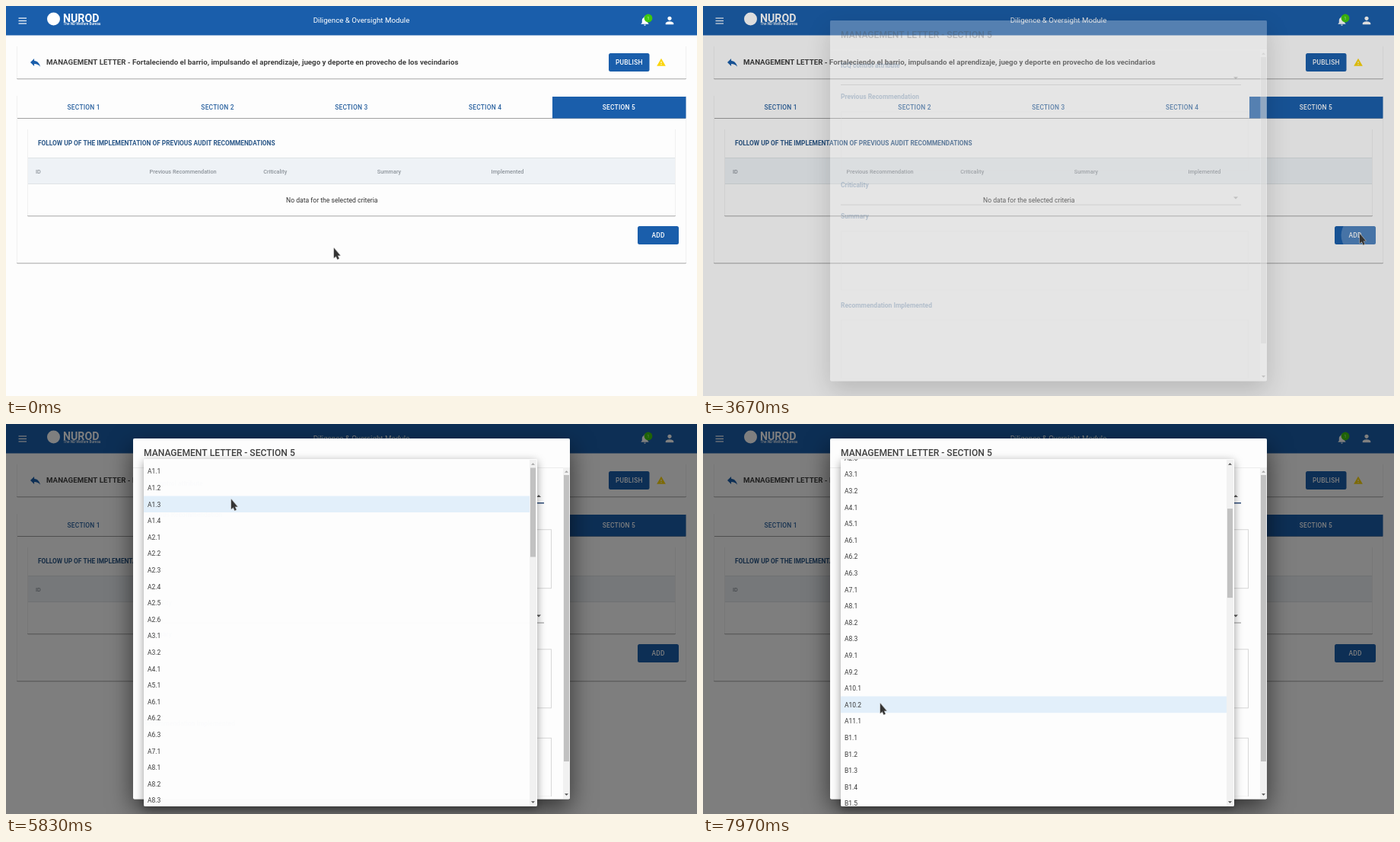
An HTML page with a canvas that plays this animation: 908x512 px, repeating every 8000 ms.

```html
<!DOCTYPE html>
<html lang="en">
<head>
<meta charset="utf-8">
<title>Management letter</title>
<style>
html, body { margin: 0; width: 100%; height: 100%; overflow: hidden; background: #fdfdfd; }
canvas { display: block; }
</style>
</head>
<body>
<canvas id="stage" width="908" height="512"></canvas>
<script>
const ctx = document.getElementById('stage').getContext('2d');
const LOOP = 8000;
const PAPER = '#fdfdfd', BLUE = '#1a5eab', WHITE = '#ffffff', INK = '#404040';
const SLATE = '#2a62a0', LABEL = '#2a5788';
const FADE_AT = 3612, MENU_AT = 5530;
const ICONS = {
  bell: new Path2D('M12 22c1.1 0 2-.9 2-2h-4c0 1.1.89 2 2 2zm6-6v-5c0-3.07-1.64-5.64-4.5-6.32V4c0-.83-.67-1.5-1.5-1.5s-1.5.67-1.5 1.5v.68C7.63 5.36 6 7.92 6 11v5l-2 2v1h16v-1l-2-2z'),
  person: new Path2D('M12 12c2.21 0 4-1.79 4-4s-1.79-4-4-4-4 1.79-4 4 1.79 4 4 4zm0 2c-2.67 0-8 1.34-8 4v2h16v-2c0-2.66-5.33-4-8-4z'),
  reply: new Path2D('M10 9V5l-7 7 7 7v-4.1c5 0 8.5 1.6 11 5.1-1-5-4-10-11-11z'),
  warning: new Path2D('M1 21h22L12 2 1 21zm12-3h-2v-2h2v2zm0-4h-2v-4h2v4z')
};
const ARROW = new Path2D('M0 0V12.6L2.7 10.2L4.6 14.4L6.5 13.5L4.6 9.4H8Z');
const HAND = new Path2D('M-1 1Q0-.6 1.2 1V5L6.5 6Q8 6.4 7.8 8.5L6.8 14.5H.6L-3.6 9.6Q-4 8 -3.4 7.6Q-2.4 7.2-1 8.8Z');

// Code groups of the list: letter and the size of each group
const CODES = [['A', [4, 6, 2, 1, 1, 3, 1, 3, 2, 2, 1]], ['B', [6, 4, 5, 3, 4]]]
  .flatMap(([letter, counts]) => counts.flatMap((n, s) =>
    Array.from({ length: n }, (_, i) => `${letter}${s + 1}.${i + 1}`)));
const ROW = 21.6, LIST_TOP = 51.2;

// Pointer path: time, x, y
const PATH = [
  [770, 431, 318], [1100, 882, 303], [1400, 882, 303], [1750, 869, 302],
  [2100, 866, 300], [2500, 866, 300], [2700, 865, 300], [3070, 863, 299],
  [4220, 863, 299], [4830, 304, 113], [5180, 296, 99], [5900, 296, 99],
  [6500, 286, 316], [7530, 286, 316], [7950, 233, 367]
];

const clamp = x => Math.max(0, Math.min(1, x));
const span = (t, from, length) => clamp((t - from) / length);
const smooth = x => x * x * (3 - 2 * x);

// Standard curve cubic-bezier(.4, 0, .2, 1)
function ease(x) {
  if (x <= 0 || x >= 1) return clamp(x);
  let lo = 0, hi = 1, u = x;
  for (let i = 0; i < 14; i++) {
    u = (lo + hi) / 2;
    const bx = 1.2 * u * (1 - u) ** 2 + 0.6 * u * u * (1 - u) + u ** 3;
    if (bx < x) lo = u; else hi = u;
  }
  return smooth(u);
}

function box(x, y, w, h, fill, radius = 0) {
  ctx.fillStyle = fill;
  ctx.beginPath();
  ctx.roundRect(x, y, w, h, radius);
  ctx.fill();
}

function circle(x, y, r, fill) {
  ctx.fillStyle = fill;
  ctx.beginPath();
  ctx.arc(x, y, r, 0, 7);
  ctx.fill();
}

// y is the middle of the capitals
function text(str, x, y, size, fill, { weight = 400, align = 'left', spacing = 0 } = {}) {
  ctx.font = `${weight} ${size}px Roboto, Arial, sans-serif`;
  ctx.letterSpacing = spacing + 'px';
  ctx.textAlign = align;
  ctx.fillStyle = fill;
  ctx.fillText(str, x, y + size * 0.355);
  ctx.letterSpacing = '0px';
}

function icon(name, x, y, scale, fill) {
  ctx.save();
  ctx.translate(x - 12 * scale, y - 12 * scale);
  ctx.scale(scale, scale);
  ctx.fillStyle = fill;
  ctx.fill(ICONS[name]);
  ctx.restore();
}

function caret(x, y, dir, fill, half = 3) {
  ctx.fillStyle = fill;
  ctx.beginPath();
  ctx.moveTo(x - half, y - dir * half / 2);
  ctx.lineTo(x + half, y - dir * half / 2);
  ctx.lineTo(x, y + dir * half / 2);
  ctx.fill();
}

function frame(x, y, w, h, edge) {
  ctx.strokeStyle = edge;
  ctx.lineWidth = 1;
  ctx.strokeRect(x + 0.5, y + 0.5, w, h);
}

const caps = { weight: 500, align: 'center', spacing: 0.24 };

function header() {
  box(0, 0, 908, 38.5, BLUE);
  for (let i = 0; i < 3; i++) box(16.5, 15.4 + i * 3.5, 10.5, 1.2, WHITE);
  circle(62.5, 17, 8.5, WHITE);
  text('NUROD', 75, 15.5, 14.2, WHITE, { weight: 700 });
  text('The ND Welfare Bureau', 75.5, 23, 4.7, WHITE, { weight: 500 });
  text('Diligence & Oversight Module', 467, 19, 9.74, WHITE, { align: 'center' });
  icon('bell', 839.5, 19.5, 0.62, WHITE);
  circle(844, 16, 5.4, '#3fc80f');
  text('1', 844, 16, 5, '#e4ffd0', { align: 'center' });
  icon('person', 872, 19, 0.66, WHITE);
}

function card(x, y, w, h) {
  box(x, y, 1, h, '#f0f0f0');
  box(x + w - 1, y, 1, h, '#f0f0f0');
  box(x, y + h - 1, w, 1, '#bdbdbd');
  box(x + 1, y + h, w - 2, 1, '#e6e6e6');
}

function button(label, x, y, w, h) {
  box(x, y, w, h, BLUE, 2.5);
  text(label, x + w / 2 + 0.1, y + h / 2, 8.4, WHITE, caps);
}

function ripple(t) {
  if (t < 3440 || t > 4100) return;
  ctx.save();
  ctx.beginPath();
  ctx.roundRect(830, 289, 54, 24, 2.5);
  ctx.clip();
  ctx.globalAlpha = 0.24 * (1 - span(t, 3740, 360));
  circle(864, 301, 39 * ease(span(t, 3440, 550)), WHITE);
  ctx.restore();
}

function page(t) {
  box(0, 0, 908, 512, PAPER);
  header();

  card(14, 53, 880, 43);
  icon('reply', 38.5, 74, 0.72, BLUE);
  text('MANAGEMENT LETTER - Fortaleciendo el barrio, impulsando el aprendizaje, juego y deporte en provecho de los vecindarios',
    53, 73.5, 9.73, INK, { weight: 700 });
  button('PUBLISH', 792, 62, 53.5, 24);
  icon('warning', 861, 74, 0.53, '#fbd50c');

  card(14, 118, 880, 220);
  box(15, 147, 878, 1, '#a0a0a0');
  box(718, 119, 175.5, 28.5, BLUE);
  for (let i = 0; i < 5; i++) {
    text('SECTION ' + (i + 1), 102.2 + i * 175.8, 133.3, 8.4, i === 4 ? WHITE : SLATE, caps);
  }

  card(28, 162, 852, 114);
  text('FOLLOW UP OF THE IMPLEMENTATION OF PREVIOUS AUDIT RECOMMENDATIONS',
    42, 180.5, 8.33, LABEL, { weight: 700 });
  box(29, 199, 850, 35, '#eef2f6');
  box(29, 199, 850, 1, '#dfe3e6');
  box(29, 233, 850, 1, '#dfe3e6');
  ['ID', 'Previous Recommendation', 'Criticality', 'Summary', 'Implemented'].forEach((name, i) =>
    text(name, 39 + i * 149.6, 217, 7.3, '#8d949b', { weight: 500 }));
  text('No data for the selected criteria', 428.3, 254.5, 8.6, '#333333', { align: 'center' });
  button('ADD', 830, 289, 54, 24);
  ripple(t);
}

function scrollbar(x, top, bottom, thumbY, thumbH, upInk) {
  box(x, top, 9, bottom - top, '#f1f1f1');
  box(x + 1, thumbY, 7, thumbH, '#c1c1c1');
  caret(x + 4.5, top + 5.5, -1, upInk, 2.5);
  caret(x + 4.5, bottom - 5.5, 1, '#505050', 2.5);
}

// Panel whose shadow falls outside only, so it stays clean while translucent
function panel(x, y, w, h, blur, dy, color) {
  ctx.save();
  ctx.beginPath();
  ctx.rect(0, 0, 908, 512);
  ctx.roundRect(x, y, w, h, 2);
  ctx.clip('evenodd');
  ctx.shadowBlur = blur;
  ctx.shadowOffsetY = dy;
  ctx.shadowColor = color;
  box(x, y, w, h, PAPER, 2);
  ctx.restore();
  box(x, y, w, h, PAPER, 2);
}

function select(label, y, open) {
  text(label, 181, y, 8.5, LABEL, { weight: 700 });
  box(181, y + 25.3, 526, open ? 1.4 : 1, open ? '#2c4a78' : '#949494');
  caret(700, y + 16.8, open ? -1 : 1, '#555555');
}

function area(label, y) {
  text(label, 181, y, 8.5, LABEL, { weight: 700 });
  frame(181, y + 19, 535, 77, '#d8d8d8');
}

function dialog(alpha, open) {
  if (!alpha) return;
  ctx.save();
  ctx.globalAlpha = alpha;
  panel(167, 19, 574, 473.5, 32, 12, 'rgba(0,0,0,.6)');
  text('MANAGEMENT LETTER - SECTION 5', 181, 38, 12.1, INK, { weight: 500 });
  box(167, 57, 574, 1, '#ececec');
  scrollbar(732, 57, 492, 67, 376, '#a3a3a3');
  ctx.beginPath();
  ctx.rect(167, 57, 565, 432);
  ctx.clip();
  select('ICQ control attribute', 77.7, open);
  area('Previous Recommendation', 119.2);
  select('Criticality', 235.2, false);
  area('Summary', 276.3);
  area('Recommendation Implemented', 392.8);
  ctx.restore();
}

function menu(t, pointer) {
  if (t < MENU_AT) return;
  const grow = ease(span(t, MENU_AT, 232));
  const scroll = 106 * (ease(span(t, 6560, 220)) + ease(span(t, 6950, 220)));
  // The hovered row is only looked up again once scrolling rests
  const settled = t < 6840 ? 0 : t < 7250 ? 106 : 212;
  const hover = Math.floor((pointer.y - LIST_TOP + settled) / ROW);

  ctx.save();
  ctx.globalAlpha = ease(span(t, MENU_AT, 348));
  ctx.translate(439, 94);
  ctx.scale(0.75 + 0.25 * grow, 0.5625 + 0.4375 * grow);
  ctx.translate(-439, -94);
  panel(181, 46, 517, 456, 12, 3, 'rgba(0,0,0,.4)');
  ctx.beginPath();
  ctx.rect(181, 46, 517, 456);
  ctx.clip();
  CODES.forEach((code, i) => {
    const y = LIST_TOP + i * ROW - scroll;
    if (y < 20 || y > 510) return;
    if (i === hover) box(181, y, 507, ROW, '#e2effa');
    text(code, 186, y + 11.2, 8.5, '#383838');
  });
  scrollbar(688, 47, 502, 57.5 + scroll * 0.253, 117, scroll > 0 ? '#505050' : '#a3a3a3');
  ctx.restore();
}

function pointerAt(t) {
  let [t0, x0, y0] = PATH[0];
  for (const [t1, x1, y1] of PATH) {
    if (t < t1) {
      const k = smooth(span(t, t0, t1 - t0 || 1));
      return { x: x0 + (x1 - x0) * k, y: y0 + (y1 - y0) * k };
    }
    [t0, x0, y0] = [t1, x1, y1];
  }
  return { x: x0, y: y0 };
}

function cursor(t, { x, y }) {
  const onButton = t < 3640 && x > 830 && x < 884 && y > 289 && y < 313;
  const onSelect = t > 4700 && t < MENU_AT && y < 104;
  const shape = onButton || onSelect ? HAND : ARROW;
  ctx.save();
  ctx.translate(x, y);
  ctx.lineJoin = 'round';
  ctx.lineWidth = 1.2;
  ctx.strokeStyle = shape === HAND ? '#d8d8d8' : '#a8a8a8';
  ctx.stroke(shape);
  ctx.fillStyle = '#333333';
  ctx.fill(shape);
  ctx.restore();
}

function draw(now) {
  const t = now % LOOP;
  const pointer = pointerAt(t);
  const fade = ease(span(t, FADE_AT, 225));
  page(t);
  box(0, 0, 908, 512, `rgba(0,0,0,${fade / 2})`);
  dialog(fade, t >= MENU_AT);
  menu(t, pointer);
  cursor(t, pointer);
}

const begin = performance.now();
function tick() {
  draw(performance.now() - begin);
  requestAnimationFrame(tick);
}
tick();
</script>
</body>
</html>
```
